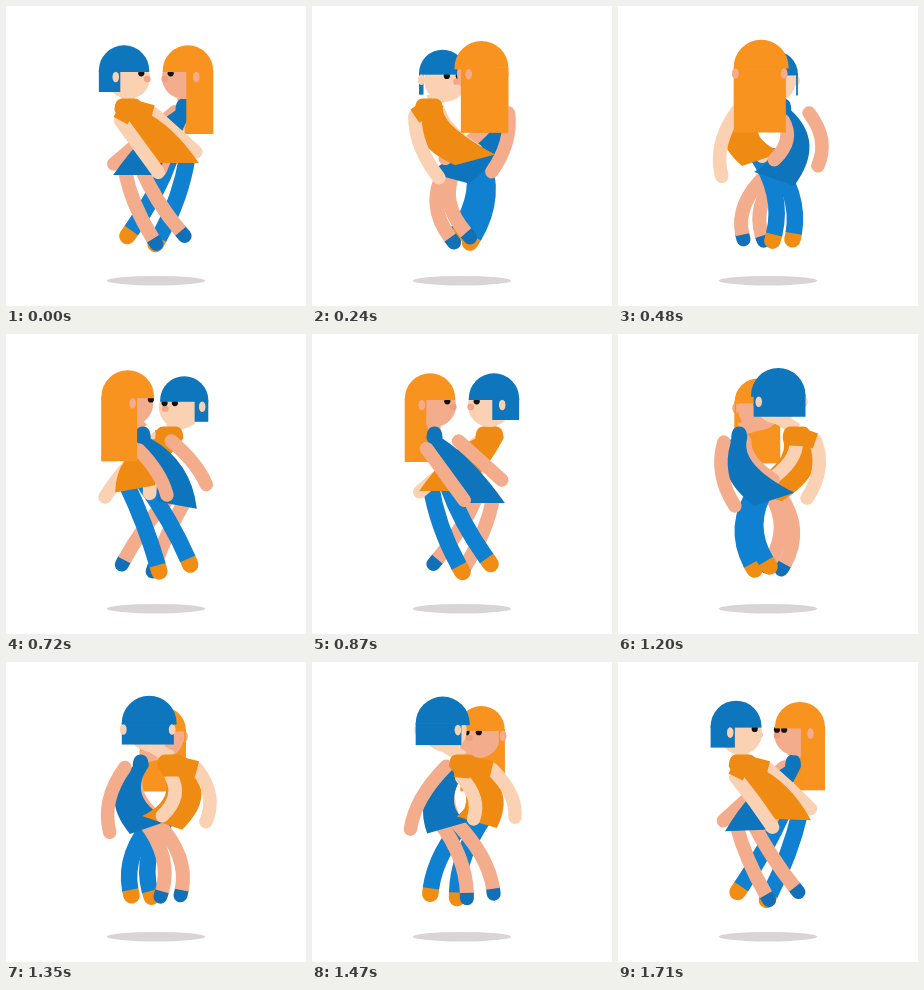
An HTML page with a canvas that plays this animation: 300x300 px, repeating every 1.74 s.

```html
<!DOCTYPE html>
<html lang="en">
<head>
<meta charset="utf-8">
<title>Whirling embrace</title>
<style>
html, body { margin: 0; width: 100%; height: 100%; overflow: hidden; background: #fff; }
canvas { display: block; width: 300px; height: 300px; }
</style>
</head>
<body>
<canvas id="stage"></canvas>
<script>
const LOOP = 1740, STEP = 30, MID = 150;
const canvas = document.getElementById('stage');
const ctx = canvas.getContext('2d');
const ratio = window.devicePixelRatio || 1;
canvas.width = canvas.height = 300 * ratio;
ctx.scale(ratio, ratio);

const bob = {
  long: false, turn: 0, hair: '#0d76bd', skin: '#fbd1b3', nose: '#f3a487',
  top: '#ef8b12', leg: '#1080d1', shoe: '#f28d14',
  shoulder: 14, flare: 19, drop: 0, legWidth: 16.5, sleeve: 16
};
const mane = {
  long: true, turn: 180, hair: '#f7931e', skin: '#f3ad8d', nose: '#ee9f80',
  top: '#0e74bb', leg: '#f3ad8d', shoe: '#1170b8',
  shoulder: 8, flare: 14, drop: 12, legWidth: 14, sleeve: 0
};

const rad = d => d * Math.PI / 180;
const cos = d => Math.cos(rad(d));
const sin = d => Math.sin(rad(d));

function oval(x, y, rx, ry, color) {
  ctx.fillStyle = color;
  ctx.beginPath();
  ctx.ellipse(x, y, rx, ry, 0, 0, 2 * Math.PI);
  ctx.fill();
}

function box(x1, y1, x2, y2, color) {
  if (x2 <= x1) return;
  ctx.fillStyle = color;
  ctx.fillRect(x1, y1, x2 - x1, y2 - y1);
}

function bend(a, c, b, width, color, cap) {
  ctx.strokeStyle = color;
  ctx.lineWidth = width;
  ctx.lineCap = cap;
  ctx.beginPath();
  ctx.moveTo(a.x, a.y);
  ctx.quadraticCurveTo(c.x, c.y, b.x, b.y);
  ctx.stroke();
}

const mix = (a, b, t) => ({ x: a.x + (b.x - a.x) * t, y: a.y + (b.y - a.y) * t });
const along = (a, c, b, t) => mix(mix(a, c, t), mix(c, b, t), t);

// control point for a curve whose middle is pushed sideways
const push = (a, b, dx) => ({ x: (a.x + b.x) / 2 + 2 * dx, y: (a.y + b.y) / 2 });

// body landmarks at heading q (degrees)
function pose(who, turn) {
  const q = (turn + who.turn) % 360;
  return {
    q,
    head: { x: MID - 32 * cos(q + 3), y: 64.5 + 3.5 * sin(q), r: 25.2 - 2.2 * sin(q) },
    chest: { x: MID - 34 * cos(q - 36), y: 92.5 },
    hem: { x: MID + 23 * cos(q + 6), y: 157 + who.drop - 4 * sin(q) }
  };
}

function legs(who, p) {
  const { q, hem } = p;
  const gap = 11.5 + 4 * cos(2 * (q + 25));
  const sway = 13 * cos(q - 60);
  for (const side of [-1, 1]) {
    const hip = { x: hem.x + side * gap * 0.6, y: hem.y - 6 };
    const foot = {
      x: MID - 19 * cos(q + 40) + side * gap,
      y: 234 + side * 4 * cos(q)
    };
    const knee = push(hip, foot, sway + 0.06 * (foot.x - hip.x));
    const ankle = along(hip, knee, foot, 0.93);
    bend(ankle, mix(ankle, foot, 0.5), foot, who.legWidth, who.shoe, 'round');
    bend(hip, mix(hip, knee, 0.93), ankle, who.legWidth, who.leg, 'butt');
  }
}

function torso(who, p) {
  const { q, chest: c, hem: h } = p, w = who.shoulder;
  const tilt = 7 * sin(q), lean = 12 * cos(q);
  const mx = (c.x + h.x) / 2 - 34 * sin(q);
  const my = (c.y + 12 + h.y) / 2;
  ctx.fillStyle = who.top;
  ctx.beginPath();
  ctx.moveTo(c.x - w, c.y + 12);
  ctx.quadraticCurveTo(c.x - w, c.y, c.x - w + 8, c.y);
  ctx.lineTo(c.x + w - 8, c.y);
  ctx.quadraticCurveTo(c.x + w, c.y, c.x + w, c.y + 12);
  ctx.quadraticCurveTo(mx + who.flare, my - lean, h.x + 20, h.y - tilt);
  ctx.lineTo(h.x - 20, h.y + tilt);
  ctx.quadraticCurveTo(mx - who.flare, my + lean, c.x - w, c.y + 12);
  ctx.fill();
}

function body(who, p) {
  const { q, chest: c, head } = p;
  const arms = [
    {
      from: { x: c.x - 8 - 8 * sin(q), y: 110 + 6 * cos(q + 40) },
      to: { x: MID - 20 + 32 * cos(q + 46), y: 162 + 10 * sin(q + 25) },
      under: q > 135 && q < 195
    },
    {
      from: { x: c.x + 12 + 17 * cos(q - 315), y: 107 },
      to: { x: MID + 22 + 31 * cos(q + 55), y: 155 + 11 * cos(q - 215) },
      under: q < 195 || q > 315
    }
  ];
  const yoke = { x: c.x, y: c.y + 8 };
  const arm = a => {
    bend(a.from, push(a.from, a.to, -8 * sin(q)), a.to, 13.5, who.skin, 'round');
    if (who.sleeve) bend(yoke, mix(yoke, a.from, 0.5), a.from, who.sleeve, who.top, 'butt');
  };
  const nape = { x: head.x + 3 * cos(q), y: head.y + 22 };
  const collar = { x: c.x, y: c.y + 3 };
  arms.filter(a => a.under).forEach(arm);
  bend(nape, mix(nape, collar, 0.5), collar, 13, who.skin, 'butt');
  torso(who, p);
  arms.filter(a => !a.under).forEach(arm);
}

function hairBack(who, p) {
  if (!who.long) return;
  const { q, head: { x, y, r } } = p;
  const end = 128 + 1.5 * sin(q);
  if (cos(q) > 0) box(x - r, y, x + r * sin(q + 8), end, who.hair);
  else box(x - r * sin(q - 8), y, x + r, end, who.hair);
}

function head(who, p) {
  const { q, head: { x, y, r } } = p;
  const brow = y + 1.5;
  const end = who.long ? 128 + 1.5 * sin(q) : y + 21.5;
  const ears = [
    { x: x - r * 0.96 * sin(q + 20), near: cos(q + 20) > 0.1 },
    { x: x + r * 0.96 * sin(q - 20), near: cos(q - 20) < -0.1 }
  ];
  const ear = e => oval(e.x, brow + 5, 3.3, 5.3, who.skin);

  ears.forEach(ear);
  const nose = () => oval(x + r * 0.92 * cos(q), brow + 7, 3.4, 3.2, who.nose);
  if (sin(q) < -0.1) nose();
  oval(x + 4.5 * cos(q), y + 7, 21.5, 21.5, who.skin);
  if (sin(q) >= -0.1) nose();

  // eyes turn more slowly than the head
  const gaze = 90 - 0.72 * (90 - (q > 270 ? q - 360 : q));
  for (const a of [gaze - 18, gaze + 18]) {
    if (a > 8 && a < 172) oval(x + r * 0.94 * cos(a), brow + 1.3, 3.1, 3.1, '#16110f');
  }

  // the gap between lo and hi leaves the face open
  const lo = cos(q + 9) > 0 ? -r * 0.95 * sin(q + 9) : -r;
  const hi = cos(q + 4) < 0 ? r * 0.95 * sin(q + 4) : r;
  ctx.fillStyle = who.hair;
  ctx.beginPath();
  ctx.arc(x, y, r, Math.PI, 2 * Math.PI);
  ctx.fill();
  box(x - r, y - 0.5, x + r, brow, who.hair);
  if (lo >= hi) {
    box(x - r, y, x + r, end, who.hair);
  } else {
    box(x - r, y, x + lo, end, who.hair);
    box(x + hi, y, x + r, end, who.hair);
  }
  ears.filter(e => e.near).forEach(ear);
}

function draw(time) {
  const turn = Math.floor(time % LOOP / STEP) * STEP / LOOP * 360;
  const pair = [bob, mane].map(who => [who, pose(who, turn)]);
  const ordered = first => first ? pair : [pair[1], pair[0]];
  const byBody = ordered(cos(turn) < 0);
  const byHead = ordered(sin(turn + 15) > 0);

  ctx.fillStyle = '#fff';
  ctx.fillRect(0, 0, 300, 300);
  oval(150, 274.7, 49, 4.8, '#d9d5d6');
  pair.forEach(a => hairBack(...a));
  [byBody[1], byBody[0]].forEach(a => legs(...a));
  head(...byHead[0]);
  byBody.forEach(a => body(...a));
  head(...byHead[1]);
}

const start = performance.now();
function tick() {
  draw(performance.now() - start);
  requestAnimationFrame(tick);
}
tick();
</script>
</body>
</html>
```
